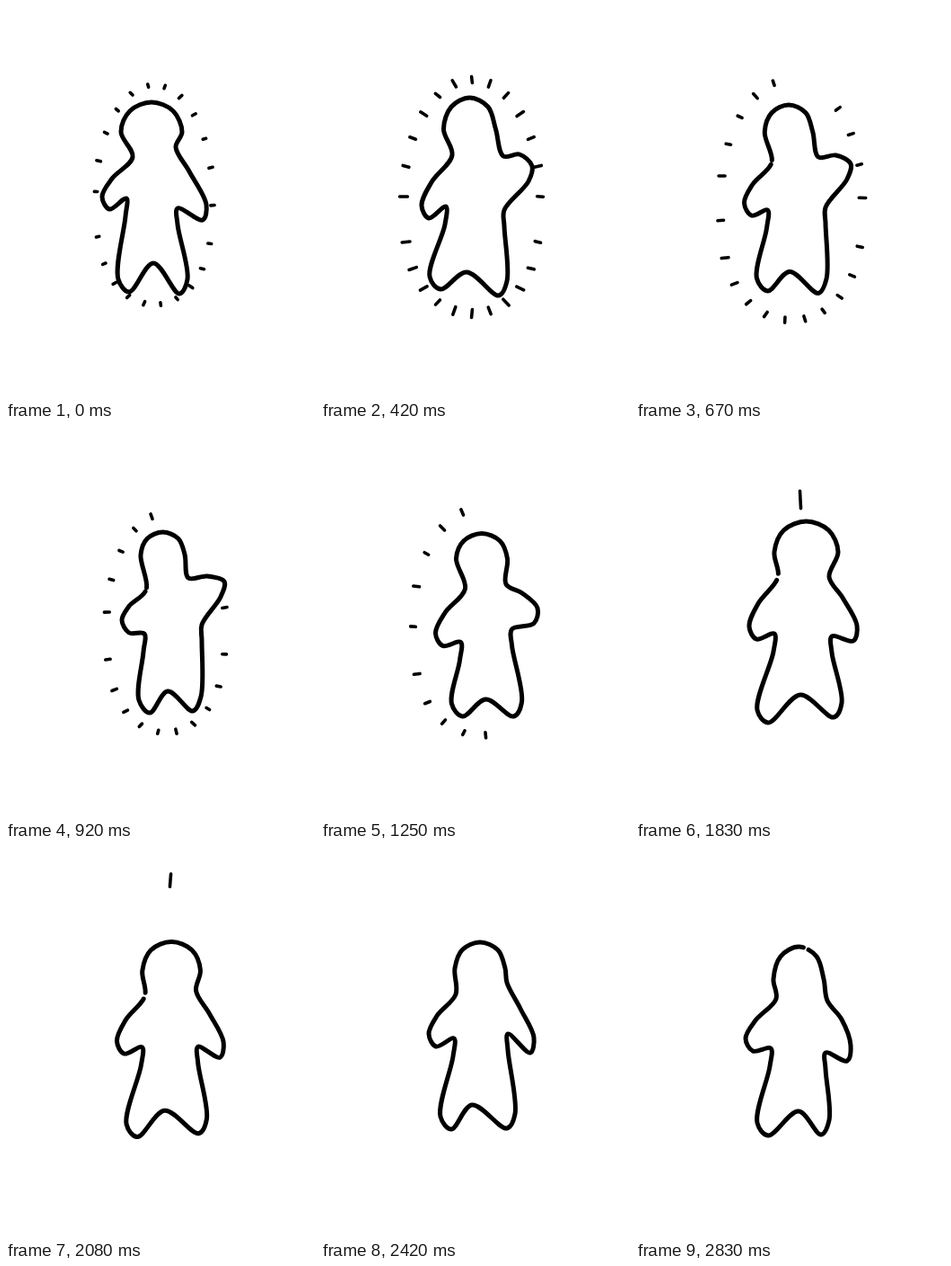
An HTML page that plays this animation: 344 by 436 pixels, repeating every 2.91 s.

```html
<!DOCTYPE html>
<html lang="en">
<head>
<meta charset="utf-8">
<title>Glowing figure</title>
<style>
html, body { margin: 0; width: 100%; height: 100%; overflow: hidden; background: #fff; }
svg { display: block; width: 100vw; height: 100vh; }
path { fill: none; stroke: #000; stroke-linecap: round; stroke-linejoin: round; }
#rays { stroke-width: 3.6; }
#body { stroke-width: 5; }
</style>
</head>
<body>
<svg viewBox="0 0 344 436"><path id="rays"/><path id="body" pathLength="100"/></svg>
<script>
const LOOP = 2910, STEPS = 35, SWELL = 8;

// at: step of the key pose.
// body: head x, y, rx, ry, then x, y of right neck, elbow, hand, pit, toe,
//       crotch, and left toe, pit, hand, neck.
// glow: ring x, y, rx, ry, first and last angle, ray count, ray length.
// gap: place and size of the break in the outline, in percent.
const poses = [
  { at: 0, gap: [0, 0], glow: [165, 210, 65, 122, -96, 247, 22, 4],
    body: [162, 140, 34, 33, 189, 157, 204, 184, 223, 221, 191, 225, 193, 320,
      164, 286, 137, 318, 134, 214, 107, 212, 141, 168] },
  { at: 5, gap: [0, 0], glow: [168, 212, 76, 130, -90, 255, 24, 8],
    body: [165.5, 137, 29, 35, 203, 167, 221, 165, 235, 178, 204, 227, 198, 322,
      162, 296, 133, 315, 139, 223, 112, 222, 146, 166] },
  { at: 11, gap: [0, 0.8], glow: [178, 219, 66, 122, -8, 256, 16, 5],
    body: [174.5, 143, 24.5, 25, 203, 169, 224, 167, 243, 173, 218, 221, 208, 317,
      180, 295, 160, 319, 154, 231, 129, 216, 156, 182] },
  { at: 19, gap: [0, 0], glow: [178, 216, 69, 115, 180, 252, 4, 7],
    body: [183.5, 152, 32.5, 31, 209, 183, 224, 205, 239, 232, 207, 231, 221, 329,
      187, 313, 155, 327, 157, 250, 126, 245, 165, 180] },
  { at: 22, gap: [0, 1.1], glow: [183, 216, 60, 134, 270, 270, 1, 17],
    body: [189.5, 140, 35.5, 34, 215, 168, 230, 191, 246, 222, 218, 234, 220, 324,
      183, 299, 147, 330, 154, 231, 126, 223, 158, 168] },
  { at: 29, gap: [0, 0], glow: [183, 216, 60, 218, 270, 270, 0, 17],
    body: [177, 136, 28, 29, 207, 152, 222, 181, 237, 213, 208, 209, 207, 314,
      168, 288, 145, 315, 148, 214, 120, 209, 150, 165] },
  { at: 34, gap: [13, 1], glow: [183, 216, 60, 218, 270, 270, 0, 17],
    body: [181, 148, 28, 36, 213, 172, 229, 193, 239, 222, 211, 230, 206, 321,
      181, 295, 147, 322, 150, 225, 122, 214, 156, 170] }
];

const mixAll = (a, b, k) => a.map((v, i) => v + (b[i] - v) * k);
const fmt = p => p.map(v => v.toFixed(2)).join(' ');
const rad = deg => deg * Math.PI / 180;
const add = ([x, y], dx, dy) => [x + dx, y + dy];

// Seeded noise from -1 to 1.
const noise = n => {
  const s = Math.sin(n * 127.1 + 3.7) * 43758.5;
  return 2 * (s - Math.floor(s)) - 1;
};

function outline([cx, cy, rx, ry, ...xy]) {
  const joints = [];
  for (let i = 0; i < xy.length; i += 2) joints.push([xy[i], xy[i + 1]]);
  const [neckR, elbowR, handR, pitR, toeR, crotch, toeL, pitL, handL, neckL] = joints;
  const head = [180, 225, 270, 315, 360].map(a =>
    [cx + rx * Math.cos(rad(a)), cy + ry * Math.sin(rad(a))]);
  return [
    neckL, ...head, neckR, elbowR, handR, add(handR, -4, 17),
    pitR, add(pitR, 0, 18), add(toeR, 9, -16), toeR, crotch,
    toeL, add(toeL, -12, -14), add(pitL, -1, 20), pitL,
    add(handL, 8, 14), handL, add(mixAll(handL, neckL, 0.5), -6, 2)
  ];
}

const root = (a, b) => Math.sqrt(Math.hypot(b[0] - a[0], b[1] - a[1])) || 0.1;

// Bezier handle at b, pointing towards c (centripetal Catmull-Rom).
function handle(a, b, c) {
  const d = root(a, b), e = root(b, c);
  return b.map((v, i) =>
    (d * d * c[i] - e * e * a[i] + (2 * d * d + 3 * d * e + e * e) * v) / (3 * d * (d + e)));
}

function smooth(pts) {
  const n = pts.length;
  const curves = pts.map((b, i) => {
    const a = pts[(i + n - 1) % n], c = pts[(i + 1) % n], e = pts[(i + 2) % n];
    return 'C' + [handle(a, b, c), handle(e, c, b), c].map(fmt).join(' ');
  });
  return 'M' + fmt(pts[0]) + curves.join('') + 'Z';
}

function rayPath([cx, cy, rx, ry, from, to, count, len], step) {
  const n = Math.round(count);
  let d = '';
  for (let i = 0; i < n; i++) {
    const a = rad(from + (to - from) * i / Math.max(1, n - 1));
    const c = Math.cos(a), s = Math.sin(a), seed = step * 40 + i;
    // The ring is flatter below the feet.
    const x = cx + rx * c, y = cy + ry * (s > 0 ? s ** 0.7 : s);
    const dir = Math.atan2(s / ry, c / rx) + 0.12 * noise(seed);
    const half = len / 2 * (1 + 0.2 * noise(seed + 0.5));
    const at = r => fmt([x + r * Math.cos(dir), y + r * Math.sin(dir)]);
    d += 'M' + at(-half) + 'L' + at(half);
  }
  return d;
}

const body = document.getElementById('body');
const rays = document.getElementById('rays');

function draw(step) {
  const i = poses.findLastIndex(p => p.at <= step);
  const from = poses[i], to = poses[i + 1] || from;
  const k = to === from ? 0 : (step - from.at) / (to.at - from.at);

  body.setAttribute('d', smooth(outline(mixAll(from.body, to.body, k))));
  const [place, size] = (k < 0.5 ? from : to).gap;
  body.setAttribute('stroke-dasharray', size ? `${100 - size} ${size}` : 'none');
  body.setAttribute('stroke-dashoffset', -(place + size / 2));

  // The glow swells between key poses.
  const glow = mixAll(from.glow, to.glow, k);
  const swell = SWELL * Math.sin(Math.PI * k);
  glow[2] += swell;
  glow[3] += swell;
  rays.setAttribute('d', rayPath(glow, step));
}

const start = performance.now();
let shown = -1;
function tick() {
  // Twelve drawings a second, held on a 10 ms clock.
  const t = (performance.now() - start) % LOOP;
  const step = Math.min(STEPS - 1, Math.floor((Math.floor(t / 10) + 0.5) * 0.12));
  if (step !== shown) draw(shown = step);
  requestAnimationFrame(tick);
}
tick();
</script>
</body>
</html>
```
